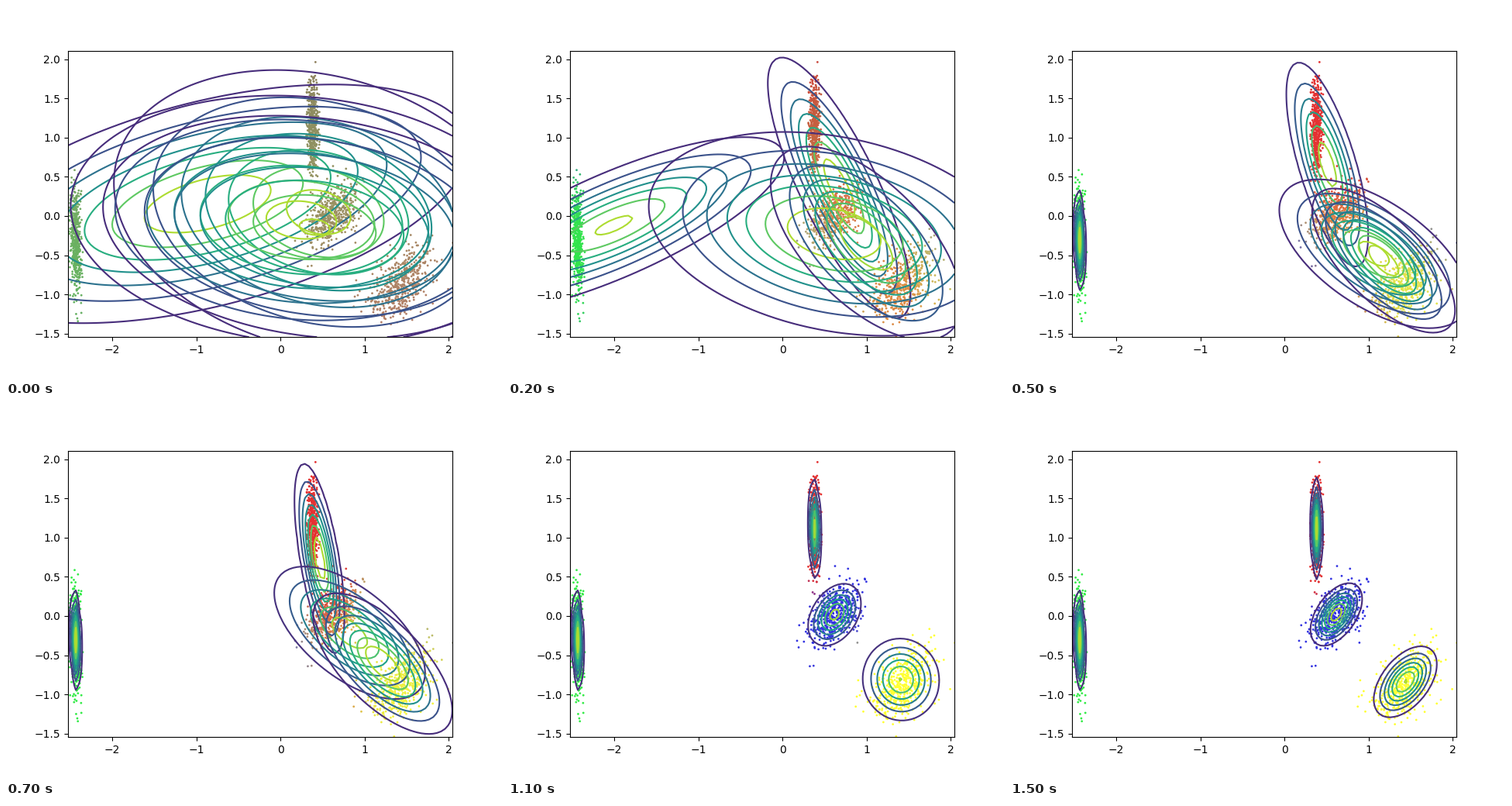
Animation, 640 px wide and 480 px high, one loop 1600 ms. Source, as a matplotlib script:

```python
import numpy as np
import matplotlib.pyplot as plt
from matplotlib.animation import FuncAnimation

FRAMES, INTERVAL = 16, 100
XLIM, YLIM = (-2.526, 2.042), (-1.546, 2.112)
LAG = 0.7       # point colours trail the drawn densities
SETTLE = 7      # from this step on each component homes in on one cluster

# Point clusters (left, top, centre, right): mean x, mean y, sigma x, sigma y, correlation
CLUSTERS = [
    (-2.435, -0.305, 0.032, 0.318, -0.2),
    (0.38, 1.12, 0.032, 0.322, -0.05),
    (0.615, 0.02, 0.151, 0.198, 0.5),
    (1.435, -0.84, 0.189, 0.229, 0.5),
]

# One mixture component per cluster, named by its point colour.
# shares: step -> how much of each cluster the component covers.
COMPONENTS = [
    dict(color=(50, 235, 70), power=1, shares={
        0: (.48, .32, .13, .07), 1: (.70, .25, .05, 0), 3: (1, 0, 0, 0)}),
    dict(color=(228, 50, 50), power=6, shares={
        0: (.13, .37, .11, .39), 1: (0, .36, .32, .32),
        3: (0, .58, .33, .09), SETTLE: (0, .65, .35, 0)}),
    dict(color=(50, 50, 225), power=6, shares={
        0: (.19, .25, .23, .33), 1: (.18, .20, .37, .25),
        3: (.01, 0, .48, .51), 5: (.01, 0, .41, .58), SETTLE: (.005, 0, .725, .27)}),
    dict(color=(255, 255, 50), power=3, shares={
        0: (.15, .17, .33, .35), 1: (.02, .15, .43, .40),
        3: (0, 0, .36, .64), SETTLE: (0, 0, .27, .73)}),
]
COLORS = np.array([c["color"] for c in COMPONENTS]) / 255


def covariance(sx, sy, rho):
    c = rho * sx * sy
    return np.array([[sx * sx, c], [c, sy * sy]])


means = np.array([c[:2] for c in CLUSTERS])
covs = np.array([covariance(*c[2:]) for c in CLUSTERS])


def shares_at(k, t):
    """Cluster shares of component k: linear at first, then easing out."""
    keys = COMPONENTS[k]["shares"]
    rows = np.array(list(keys.values()))
    now = np.array([np.interp(t, list(keys), col) for col in rows.T])
    if t > SETTLE:
        u = (t - SETTLE) / (FRAMES - 1 - SETTLE)
        left = (1 - u) ** COMPONENTS[k]["power"]
        now = left * now + (1 - left) * np.eye(4)[k]
    return now / now.sum()


def gaussian(k, t):
    """Mean and covariance of the clusters pooled by their shares."""
    share = shares_at(k, t)
    mean = share @ means
    d = means - mean
    cov = np.einsum("i,ijk->jk", share, covs) + (share[:, None] * d).T @ d
    return mean, cov


def weights(t):
    """Mixing weights: the blue component nearly dies out for a while."""
    blue = 0.25 - 0.2 * np.exp(-((t - 5.5) / 3) ** 2)
    rest = (1 - blue) / 3
    return rest, rest, blue, rest


def density(x, y, mean, cov):
    dx, dy = x - mean[0], y - mean[1]
    det = np.linalg.det(cov)
    q = (cov[1, 1] * dx**2 - 2 * cov[0, 1] * dx * dy + cov[0, 0] * dy**2) / det
    return np.exp(-q / 2) / (2 * np.pi * np.sqrt(det)) + 1e-30


def point_colors(step):
    t = max(step - LAG, 0)
    resp = np.array([w * density(*points.T, *gaussian(k, t))
                     for k, w in enumerate(weights(t))])
    resp **= 1 - 0.5 * np.exp(-2 * step)   # soft memberships at the start
    resp /= resp.sum(axis=0)
    return np.clip(resp.T @ COLORS, 0, 1)


rng = np.random.default_rng(4)
points = np.vstack([rng.multivariate_normal(m, c, 500) for m, c in zip(means, covs)])
gx, gy = np.meshgrid(np.linspace(*XLIM, 100), np.linspace(*YLIM, 100))

fig, ax = plt.subplots(figsize=(6.4, 4.8), dpi=100)


def draw(step):
    ax.clear()
    ax.scatter(*points.T, s=4, c=point_colors(step), linewidths=0)
    for k in range(len(COMPONENTS)):
        ax.contour(gx, gy, density(gx, gy, *gaussian(k, step)), cmap="viridis")
    ax.set_xlim(XLIM)
    ax.set_ylim(YLIM)
    return []


anim = FuncAnimation(fig, draw, frames=FRAMES, interval=INTERVAL,
                     init_func=lambda: [], repeat=True)
plt.show()
```
